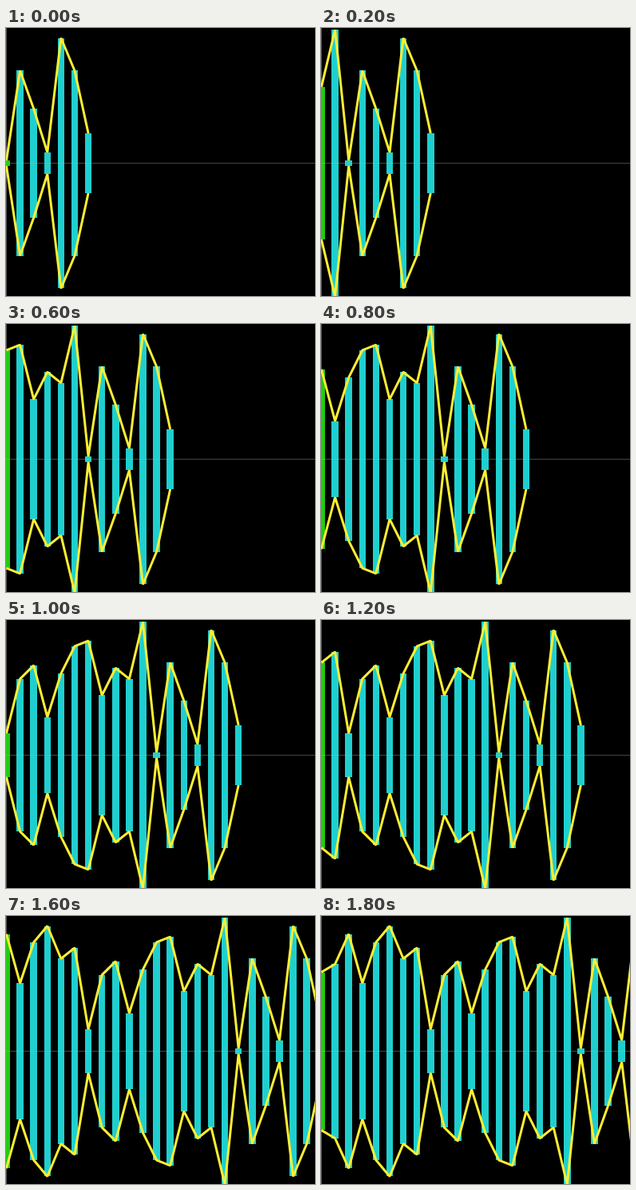
An HTML page for the animation above (1900 ms loop, 387 by 336 pixels).

```html
<!DOCTYPE html>
<html lang="en">
<head>
<meta charset="utf-8">
<title>Scrolling bars</title>
<style>
  html, body { margin: 0; width: 100%; height: 100%; overflow: hidden; background: #000; }
  svg { display: block; width: 387px; height: 336px; }
</style>
</head>
<body>
<svg viewBox="0 0 387 336">
  <rect width="387" height="336" fill="#000"/>
  <rect y="0" width="1" height="336" fill="#555"/>
  <g shape-rendering="crispEdges">
    <path id="bars" fill="#1fcfcf"/>
    <path id="head" fill="#22cc11"/>
  </g>
  <rect y="169" width="387" height="1" fill="#aaa" opacity=".4"/>
  <path id="outline" fill="none" stroke="#ffee33" stroke-width="3" stroke-linejoin="bevel"/>
</svg>
<script>
const LOOP = 1900, STEP = 100;
const MID = 169.5, UNIT = 3.413, GAP = 17.1, LEFT = 0.5, WIDTH = 8.5;

// Samples from oldest to newest; the newest one enters at the left edge.
const samples = [11, 34, 46, 4, 20, 34, 1, 49, 28, 32, 22, 42, 40,
                 30, 14, 33, 28, 8, 38, 34, 46, 40, 25, 43, 32, 29];
const el = id => document.getElementById(id);
const bars = el('bars'), head = el('head'), outline = el('outline');
const x = i => LEFT + i * GAP;

function bar(i, size) {
  const h = size * UNIT;
  return `M${x(i) - WIDTH / 2} ${MID - h}h${WIDTH}v${2 * h}h${-WIDTH}z`;
}

function edge(values, side) {
  return 'M' + values.map((v, i) => `${x(i)} ${MID + side * v * UNIT}`).join('L');
}

function draw(time) {
  const step = Math.floor((time % LOOP) / STEP);
  // Two samples arrive together at 700 ms.
  const count = 7 + step + (step >= 7 ? 1 : 0);
  const shown = samples.slice(0, count).reverse();
  bars.setAttribute('d', shown.slice(1).map((v, i) => bar(i + 1, v)).join(''));
  head.setAttribute('d', bar(0, shown[0]));
  outline.setAttribute('d', edge(shown, -1) + edge(shown, 1));
}

const start = performance.now();
function tick() {
  draw(performance.now() - start);
  requestAnimationFrame(tick);
}
tick();
</script>
</body>
</html>
```
